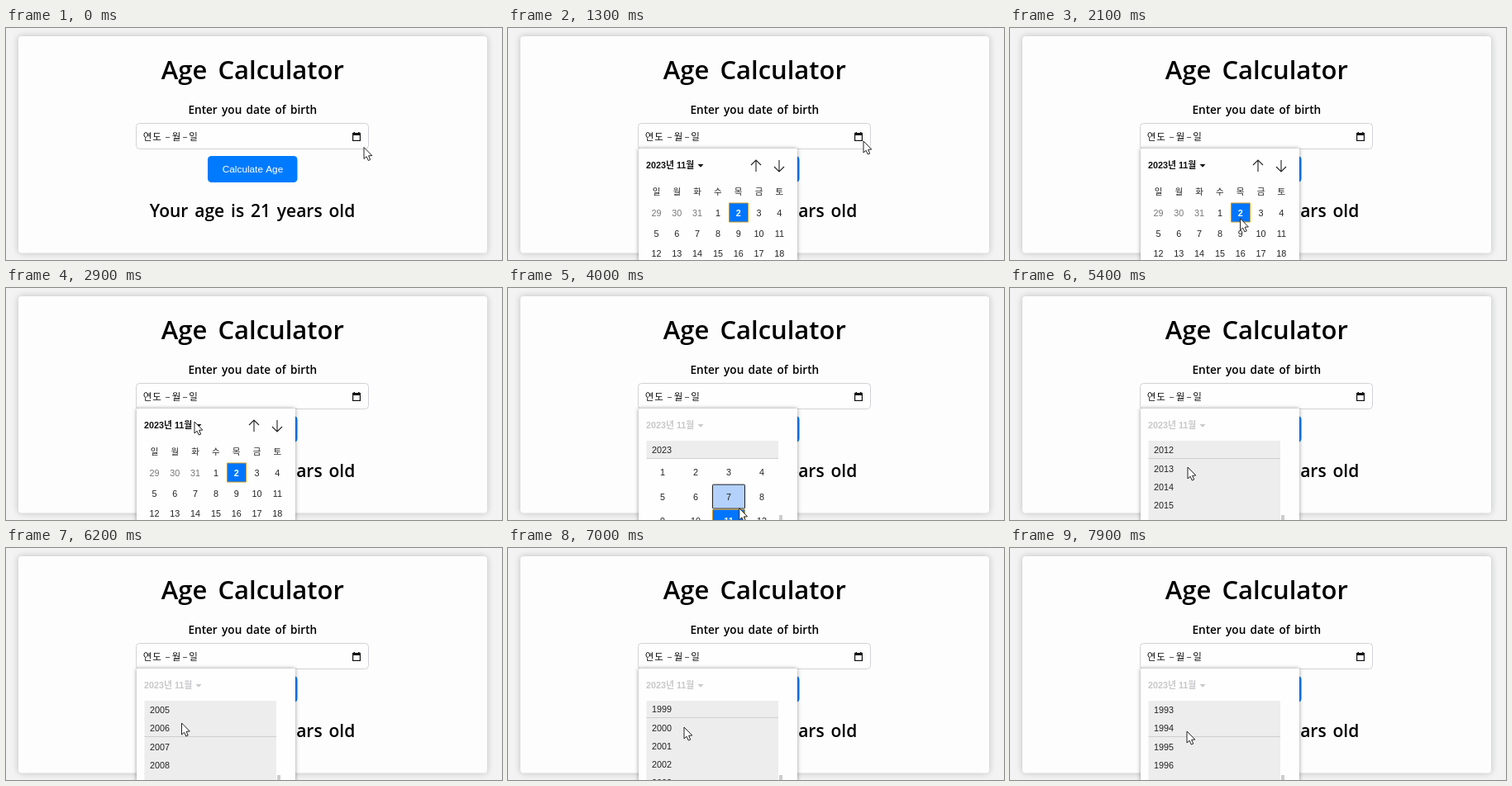
Animation, 600 px wide and 281 px high, one loop 8 s. Source, as an HTML page with a canvas:

```html
<!DOCTYPE html>
<html lang="ko">
<head>
<meta charset="utf-8">
<title>Age Calculator</title>
<style>
html, body { margin: 0; width: 100%; height: 100%; overflow: hidden; background: #f3f3f4; }
canvas { display: block; width: 600px; height: 281px; }
</style>
</head>
<body>
<canvas id="stage"></canvas>
<script>
const LOOP = 8000, TICK = 100;
const OPEN_AT = 1000, YEARS_AT = 3100;
const ROW = 22.25;
const SANS = '"Liberation Sans", Arial, "Noto Sans CJK KR", sans-serif';
const HEAD = '"Open Sans", "Noto Sans", sans-serif';
const HANGUL = '"Noto Sans CJK KR", "Noto Sans CJK", sans-serif';

const canvas = document.getElementById('stage');
const ctx = canvas.getContext('2d');
const dpr = window.devicePixelRatio || 1;
canvas.width = 600 * dpr;
canvas.height = 281 * dpr;

// Cursor path: time, x, y
const path = [
  [0, 433, 144.5], [100, 433, 144.5], [400, 430, 137], [1300, 430, 137],
  [1750, 336, 205], [2150, 276, 232], [2550, 238, 185], [2900, 228, 162],
  [3200, 228, 163], [3600, 258, 232], [3900, 279, 266], [4050, 280, 267],
  [4400, 232, 232], [4700, 218, 222], [5400, 215, 217], [6200, 212.5, 212],
  [7000, 213, 217], [7900, 214, 222], [8000, 214, 222]
];

// Wheel turns, three rows each
const turns = [4150, 4472, 4840, 5190, 5530, 5860, 6280, 6680, 7080, 7480];
const TURN_MS = 340;

const clamp = v => Math.max(0, Math.min(1, v));
const smooth = v => v * v * (3 - 2 * v);

function cursorAt(t) {
  let i = 1;
  while (i < path.length - 1 && path[i][0] < t) i++;
  const [t0, x0, y0] = path[i - 1], [t1, x1, y1] = path[i];
  const k = smooth(clamp((t - t0) / (t1 - t0)));
  return [x0 + (x1 - x0) * k, y0 + (y1 - y0) * k];
}

function scrollAt(t) {
  return turns.reduce((sum, s) => sum + 3 * ROW * smooth(clamp((t - s) / TURN_MS)), 0);
}

function text(str, x, y, font, color = '#000', align = 'left', gap = 0) {
  ctx.font = font;
  ctx.fillStyle = color;
  ctx.textAlign = align;
  ctx.wordSpacing = gap + 'px';
  ctx.fillText(str, x, y);
}

function rect(x, y, w, h, fill) {
  ctx.fillStyle = fill;
  ctx.fillRect(x, y, w, h);
}

function box(x, y, w, h, r, fill, stroke) {
  ctx.beginPath();
  ctx.roundRect(x, y, w, h, r);
  ctx.fillStyle = fill;
  ctx.fill();
  if (stroke) {
    ctx.strokeStyle = stroke;
    ctx.lineWidth = 1;
    ctx.stroke();
  }
}

function shadowed(blur, color, draw) {
  ctx.save();
  ctx.shadowBlur = blur * dpr;
  ctx.shadowColor = color;
  draw();
  ctx.restore();
}

function poly(points, fill) {
  ctx.beginPath();
  points.forEach(([x, y]) => ctx.lineTo(x, y));
  ctx.closePath();
  ctx.fillStyle = fill;
  ctx.fill();
}

function page() {
  rect(0, 0, 600, 281, '#f3f3f4');
  shadowed(9, 'rgba(0,0,0,.22)', () => box(15, 10, 567, 262.5, 4, '#fefdfe'));
  text('Age Calculator', 298.3, 62, '600 31px ' + HEAD, '#000', 'center', 5);
  text('Enter you date of birth', 298.3, 103.5, '600 13.6px ' + HEAD, '#000', 'center', 1.8);
  box(157.5, 115.5, 281, 31, 4, '#fefefe', '#d2d2d6');
  [['연', 171], ['도', 182.5], ['–', 195.5], ['월', 206], ['–', 216.5], ['일', 226.5]]
    .forEach(([c, x]) => text(c, x, 135.5, '11.5px ' + HANGUL, '#111', 'center'));
  calendarIcon();
  box(244, 155, 108.5, 32, 4.5, '#007bff');
  text('Calculate Age', 298.5, 175, '11.8px ' + SANS, '#fff', 'center');
  text('Your age is 21 years old', 298, 228.5, '600 21px ' + HEAD, '#000', 'center', 2.4);
}

function calendarIcon() {
  rect(419, 127, 10, 10, '#111');
  rect(420.2, 130, 7.6, 5.8, '#fff');
  rect(420.5, 126, 1.5, 2, '#111');
  rect(426, 126, 1.5, 2, '#111');
}

function arrow(x, dir) {
  const y = 167, tip = y + dir * 7;
  ctx.beginPath();
  ctx.moveTo(x, y - dir * 7);
  ctx.lineTo(x, tip);
  ctx.moveTo(x - 6, tip - dir * 6);
  ctx.lineTo(x, tip);
  ctx.lineTo(x + 6, tip - dir * 6);
  ctx.strokeStyle = '#222';
  ctx.lineWidth = 1.1;
  ctx.stroke();
}

function popup(t) {
  const years = t >= YEARS_AT;
  shadowed(5, 'rgba(0,0,0,.4)', () => box(158, 146, 192, 160, 1, '#fefefe'));
  const tint = years ? '#c8c8ca' : '#111';
  text('2023년 11월', 167, 170, '700 10.8px ' + SANS, tint);
  poly([[229.5, 165], [236.5, 165], [233, 168.7]], tint);
  if (years) yearList(t);
  else days();
}

function days() {
  const col = i => 179.5 + i * 24.8;
  arrow(300, -1);
  arrow(328, 1);
  [...'일월화수목금토'].forEach((d, i) =>
    text(d, col(i), 202, '10.5px ' + HANGUL, '#222', 'center'));
  box(267.5, 212, 23, 23, 0, '#0075ff', '#d39a22');
  for (let i = 0; i < 21; i++) {
    const n = i < 3 ? 29 + i : i - 2;
    const bold = n === 2 ? '700 ' : '';
    const color = i < 3 ? '#777' : n === 2 ? '#fff' : '#222';
    text(n, col(i % 7), 228 + Math.floor(i / 7) * 24.7, bold + '10.8px ' + SANS, color, 'center');
  }
}

function yearList(t) {
  const scroll = scrollAt(t);
  ctx.save();
  ctx.beginPath();
  ctx.rect(167, 185, 170, 96);
  ctx.clip();
  for (let y = 1985; y <= 2023; y++) {
    const mid = Math.round(195 + (y - 2023) * ROW + scroll);
    if (mid < 170 || mid > 300) continue;
    rect(167.5, mid - 11, 159.5, 23, '#ededee');
    rect(167.5, mid + 11, 159.5, 1, '#cfcfcf');
    text(y, 174, mid + 4.5, '10.8px ' + SANS, '#222');
  }
  if (scroll < 100) months(scroll, t);
  rect(328, 275, 4, 10, '#cdcdcd');
  ctx.restore();
}

function months(scroll, t) {
  const [cx, cy] = cursorAt(t);
  const hoverCol = Math.floor((cx - 167) / 40);
  const hoverRow = Math.floor((cy - 208.5) / 29.6);
  for (let i = 0; i < 12; i++) {
    const c = i % 4, r = Math.floor(i / 4);
    const x = 187 + c * 40, y = 223 + r * 29.6 + scroll;
    const now = i === 10;
    const hover = scroll === 0 && c === hoverCol && r === hoverRow;
    if (now) box(x - 19.5, y - 14, 39, 28.5, 1, '#0075ff', '#d39a22');
    else if (hover) box(x - 19.5, y - 14.5, 39, 29, 1, '#b3d1fb', '#222');
    text(i + 1, x, y + 4, (now ? '700 ' : '') + '10.8px ' + SANS, now ? '#fff' : '#222', 'center');
  }
}

function pointer([x, y]) {
  ctx.save();
  ctx.translate(x, y);
  ctx.beginPath();
  [[0, 0], [0, 14], [3.1, 11.2], [5.3, 16], [7.7, 15], [5.6, 10.3], [9.8, 10]]
    .forEach(([px, py]) => ctx.lineTo(px, py));
  ctx.closePath();
  ctx.fillStyle = '#fff';
  ctx.fill();
  ctx.strokeStyle = '#222';
  ctx.lineWidth = 1;
  ctx.stroke();
  ctx.restore();
}

function frame(now) {
  const t = Math.floor((now % LOOP) / TICK) * TICK;
  ctx.setTransform(dpr, 0, 0, dpr, 0, 0);
  page();
  if (t >= OPEN_AT) popup(t);
  pointer(cursorAt(t));
  requestAnimationFrame(frame);
}
requestAnimationFrame(frame);
</script>
</body>
</html>
```
